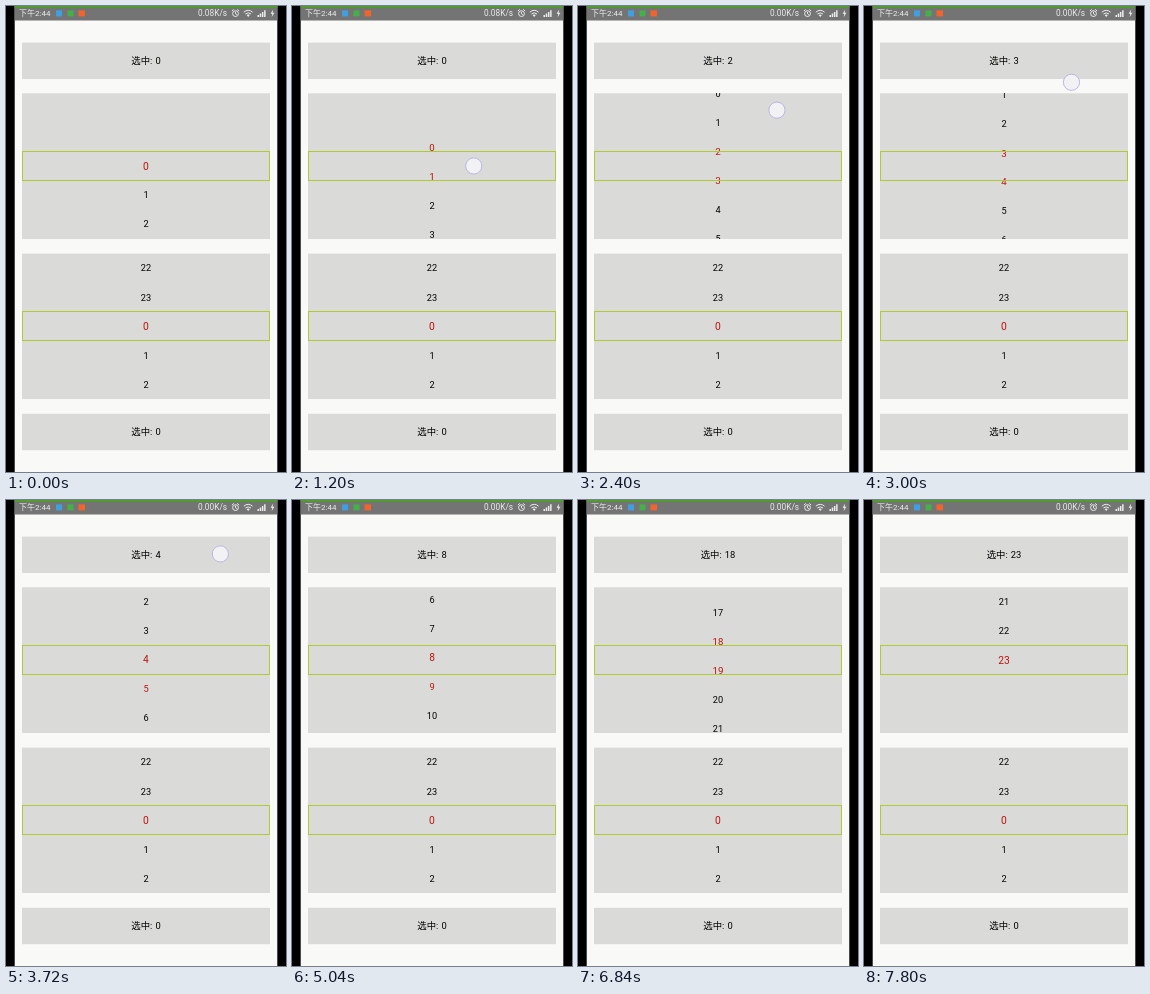
Write an HTML page that moves like this. It is 280x466 px and loops after 8000 ms.

```html
<!DOCTYPE html>
<html lang="zh">
<head>
<meta charset="utf-8">
<title>Wheel picker</title>
<style>
  html, body { margin: 0; width: 100%; height: 100%; overflow: hidden; background: #000; }
  svg { display: block; width: 100%; height: 100%; }
  text { font-family: Roboto, "Noto Sans CJK SC", "Noto Sans CJK", sans-serif; }
  .label { font-size: 9.4px; word-spacing: 0.8px; text-anchor: middle; }
  .item { text-anchor: middle; }
  .bar { fill: #ececec; }
  .panel { fill: #dadad9; }
  .frame { fill: none; stroke: #aecb36; stroke-width: 1; }
  .icon { fill: none; stroke: #ececec; stroke-width: 1; }
</style>
</head>
<body>
<svg viewBox="0 0 280 466">
  <defs>
    <clipPath id="window"><rect x="16" y="87" width="248" height="146"/></clipPath>
  </defs>
  <rect width="280" height="466" fill="#000"/>
  <rect x="8.7" width="262.6" height="466" fill="#f9f9f7"/>
  <rect x="8.7" width="262.6" height="14.5" fill="#747474"/>
  <rect x="8.7" width="262.6" height="1.5" fill="#46a81c"/>

  <text class="bar" x="13" y="10.4" font-size="8">下午2:44</text>
  <rect x="50" y="4.4" width="6" height="6" fill="#3f9fe0"/>
  <rect x="61.5" y="4.4" width="6" height="6" fill="#45b04a"/>
  <rect x="72.5" y="4.4" width="6.5" height="6" fill="#f0642d"/>
  <text class="bar" id="speed" x="192" y="10.4" font-size="8.3"></text>
  <g class="icon">
    <circle cx="229.5" cy="7.6" r="2.9"/>
    <path d="M229.5 5.8v2l1.3.8M225.9 5l1.8-1.6M233.1 5l-1.8-1.6"/>
    <path d="M237.8 6.2q4.4-3.8 8.8 0M239.4 8q2.8-2.3 5.6 0"/>
  </g>
  <g fill="#ececec">
    <path d="M240.6 9q1.6-1.2 3.2 0l-1.6 2z"/>
    <path d="M251.5 9h1.5v2h-1.5zM253.7 7.6h1.5v3.4h-1.5zM255.9 6h1.5v5h-1.5zM258.1 4.2h1.5v6.8h-1.5z"/>
    <path d="M267.2 3.6l-2.6 4.2h1.7l-.7 3.4 2.8-4.5h-1.8z"/>
  </g>

  <g class="panel">
    <rect x="16" y="36.6" width="248" height="36.4"/>
    <rect x="16" y="87.3" width="248" height="145.7"/>
    <rect x="16" y="247.6" width="248" height="145.4"/>
    <rect x="16" y="407.8" width="248" height="36.4"/>
  </g>
  <text class="label" id="picked" x="140" y="58.2"></text>
  <text class="label" x="140" y="429.4">选中: 0</text>
  <g id="wheel" clip-path="url(#window)"></g>
  <g id="ring"></g>
  <rect class="frame" x="16.5" y="145.5" width="247" height="29"/>
  <rect class="frame" x="16.5" y="305.5" width="247" height="29"/>
  <circle id="touch" r="8.1" fill="#f2f2f4" stroke="#b8b8e0"/>
</svg>
<script>
const LOOP = 8000, STEP = 120, ROW = 29, COUNT = 24;
const $ = id => document.getElementById(id);

// [time, scroll offset in px]
const scrollKeys = [
  [840, 1.7], [3480, 121.8], [3720, 116.5], [3960, 116], [4080, 116],
  [4560, 190], [4800, 225], [5040, 234.5], [5160, 232.6], [5280, 232],
  [5400, 245], [5640, 310], [5880, 355], [6120, 375], [6240, 377],
  [6360, 390], [6600, 470], [6840, 540.5], [7080, 606], [7320, 655],
  [7440, 667.5], [7560, 667]
];

// Finger strokes; the finger rests between stop and lift
const strokes = [
  { start: 840, stop: 3480, lift: 3840, x: 176.6, y: 176.7, vx: 0.0143, vy: -0.0465 },
  { start: 4200, stop: 4560, lift: 4560, x: 180, y: 190, vx: 0.04, vy: -0.154 },
  { start: 5400, stop: 5640, lift: 5640, x: 180, y: 190, vx: 0.06, vy: -0.27 },
  { start: 6360, stop: 6600, lift: 6600, x: 180, y: 190, vx: 0.06, vy: -0.33 }
];

function scrollAt(t) {
  if (t < scrollKeys[0][0]) return 0;
  const i = scrollKeys.findIndex(k => k[0] > t);
  if (i < 0) return scrollKeys[scrollKeys.length - 1][1];
  const [t0, p0] = scrollKeys[i - 1], [t1, p1] = scrollKeys[i];
  return p0 + (p1 - p0) * (t - t0) / (t1 - t0);
}

function addItem(parent, value) {
  const el = document.createElementNS("http://www.w3.org/2000/svg", "text");
  el.setAttribute("class", "item");
  el.setAttribute("x", 140);
  el.textContent = value;
  parent.appendChild(el);
  return el;
}

// distance is measured in rows from the middle
function placeItem(el, y, distance) {
  const near = Math.max(0, 1 - Math.abs(distance));
  const size = 9.2 + 1.1 * near;
  el.setAttribute("font-size", size);
  el.setAttribute("y", y + size * 0.355);
  el.setAttribute("fill", near > 0 ? "#bd140c" : "#000");
}

const items = Array.from({ length: COUNT }, (_, i) => addItem($("wheel"), i));
[22, 23, 0, 1, 2].forEach((value, i) =>
  placeItem(addItem($("ring"), value), 320.4 + (i - 2) * 29.1, i - 2));

function drawTouch(t) {
  const s = strokes.find(s => t >= s.start && t < s.lift);
  const dot = $("touch");
  dot.setAttribute("visibility", s ? "visible" : "hidden");
  if (!s) return;
  const dt = Math.min(t, s.stop) - s.start;
  dot.setAttribute("cx", s.x + s.vx * dt);
  dot.setAttribute("cy", s.y + s.vy * dt);
}

function draw(time) {
  const t = Math.floor(time / STEP) * STEP;
  const offset = scrollAt(t);
  const pos = offset / ROW;
  items.forEach((el, i) => placeItem(el, 160 + i * ROW - offset, i - pos));
  $("picked").textContent = "选中: " + Math.floor(pos);
  $("speed").textContent = (t < 1680 ? "0.08" : "0.00") + "K/s";
  drawTouch(t);
}

const begin = performance.now();
function tick() {
  draw((performance.now() - begin) % LOOP);
  requestAnimationFrame(tick);
}
tick();
</script>
</body>
</html>
```
